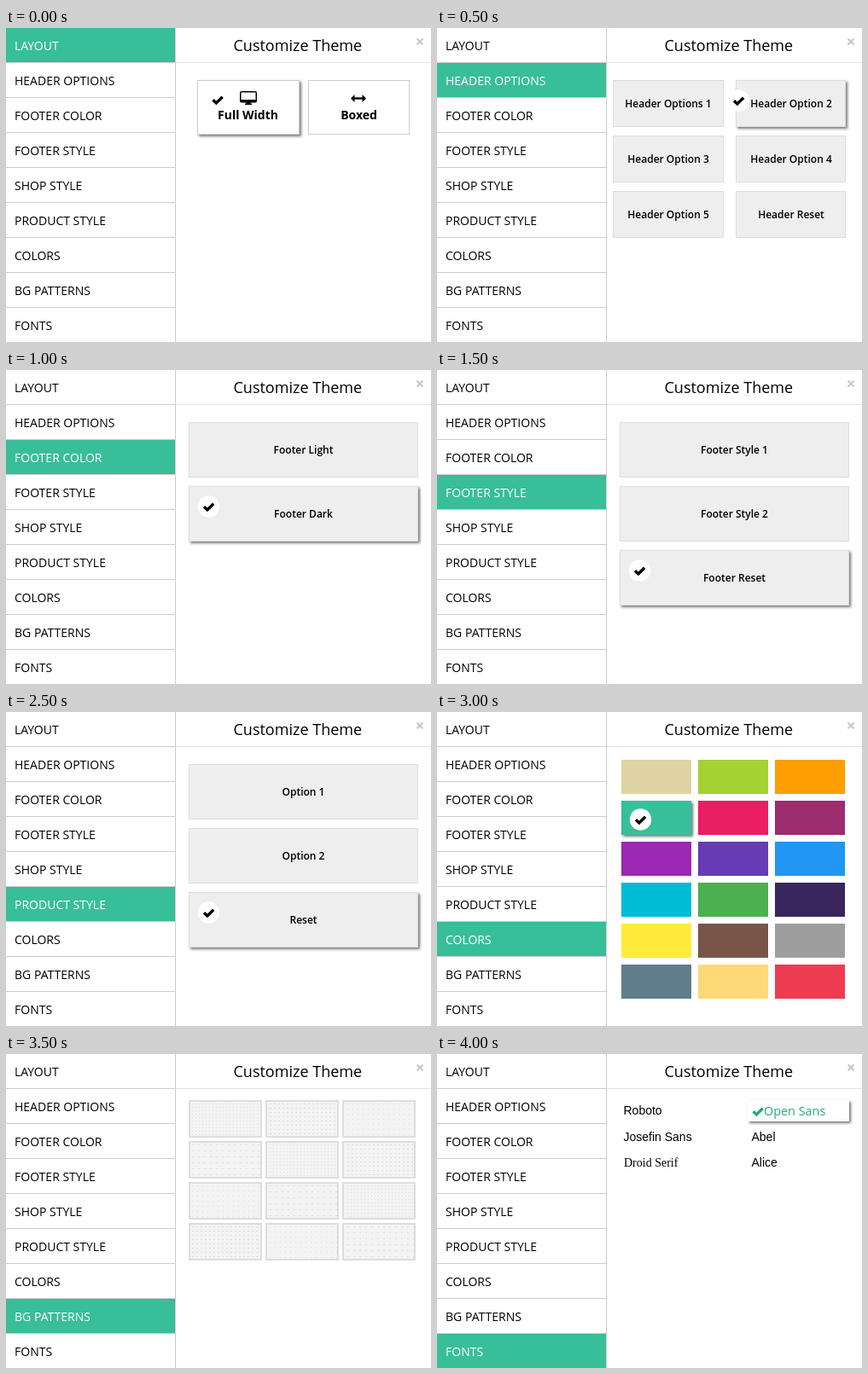
An HTML page with a canvas that plays this animation: 498 by 368 pixels, repeating every 4.5 s.

```html
<!DOCTYPE html>
<html lang="en">
<head>
<meta charset="utf-8">
<title>Customize Theme</title>
<style>
html, body { margin: 0; width: 100%; height: 100%; overflow: hidden; background: #fff; }
canvas { display: block; }
</style>
</head>
<body>
<canvas id="stage" width="498" height="368"></canvas>
<script>
const ctx = document.getElementById('stage').getContext('2d');
const GREEN = '#38be99';
const STEP = 500;
const OPEN = '"Open Sans", sans-serif';
const ARIAL = '"Liberation Sans", Arial, sans-serif';
const MENU = ['LAYOUT', 'HEADER OPTIONS', 'FOOTER COLOR', 'FOOTER STYLE', 'SHOP STYLE',
  'PRODUCT STYLE', 'COLORS', 'BG PATTERNS', 'FONTS'];
const SWATCHES = ['#dfd2a3', '#a4d233', '#ff9e01', GREEN, '#e91e63', '#9c2d6f',
  '#9c27b0', '#673ab7', '#2196f3', '#00bcd4', '#4caf50', '#38265c',
  '#ffeb3b', '#795548', '#9e9e9e', '#607d8b', '#ffd878', '#ed3c52'];

function rect(x, y, w, h, color) {
  ctx.fillStyle = color;
  ctx.fillRect(x, y, w, h);
}

function text(str, x, y, font, color = '#000', align = 'left') {
  ctx.font = font;
  ctx.fillStyle = color;
  ctx.textAlign = align;
  ctx.fillText(str, x, y);
}

function raised(x, y, w, h, color) {
  ctx.save();
  ctx.shadowColor = '#777';
  ctx.shadowBlur = 3;
  ctx.shadowOffsetX = ctx.shadowOffsetY = 2;
  rect(x, y, w, h, color);
  ctx.restore();
}

function card(x, y, w, h, fill, border, selected) {
  (selected ? raised : rect)(x, y, w, h, border);
  rect(x + 1, y + 1, w - 2, h - 2, fill);
}

function check(x, y, color = '#000') {
  ctx.strokeStyle = color;
  ctx.lineWidth = 3.4;
  ctx.beginPath();
  ctx.moveTo(x - 5.5, y - 0.2);
  ctx.lineTo(x - 1.6, y + 3.5);
  ctx.lineTo(x + 5.7, y - 3.7);
  ctx.stroke();
}

function badge(x, y) {
  ctx.fillStyle = '#fff';
  ctx.beginPath();
  ctx.arc(x, y, 12.7, 0, 7);
  ctx.fill();
  check(x, y + 0.5);
}

function monitor(x, y) {
  ctx.fillStyle = '#000';
  ctx.beginPath();
  ctx.roundRect(x, y, 20, 13.5, 2);
  ctx.fill();
  rect(x + 1.5, y + 1.5, 17, 8.5, '#fff');
  rect(x + 7.5, y + 13, 5, 2, '#000');
  rect(x + 6, y + 14.5, 8, 1.5, '#000');
}

function doubleArrow(x, y) {
  ctx.fillStyle = '#000';
  for (const s of [-1, 1]) {
    ctx.beginPath();
    ctx.moveTo(x + s * 9, y);
    ctx.lineTo(x + s * 4.5, y - 4.5);
    ctx.lineTo(x + s * 4.5, y + 4.5);
    ctx.fill();
  }
  rect(x - 6, y - 1.2, 12, 2.4, '#000');
}

function layout() {
  card(224, 61, 120, 64, '#fff', '#ccc', true);
  card(354, 61, 119, 64, '#fff', '#ccc', false);
  check(248, 84.5);
  monitor(274, 74);
  doubleArrow(413, 82.5);
  text('Full Width', 283.5, 107, 'bold 14px ' + OPEN, '#000', 'center');
  text('Boxed', 413.5, 107, 'bold 14px ' + OPEN, '#000', 'center');
}

function headers() {
  const names = ['Header Options 1', 'Header Option 2', 'Header Option 3',
    'Header Option 4', 'Header Option 5', 'Header Reset'];
  names.forEach((name, i) => {
    const x = 206 + i % 2 * 144, y = 61 + (i >> 1) * 65;
    card(x, y, i % 2 ? 129 : 130, 55, '#eee', '#ddd', i === 1);
    if (i === 1) badge(x + 3.5, y + 24);
    text(name, x + 65, y + 32, '600 12px ' + OPEN, '#000', 'center');
  });
}

function stack(names, selected) {
  names.forEach((name, i) => {
    const y = 61 + i * 75;
    card(214, y, 269, 65, '#eee', '#ddd', i === selected);
    if (i === selected) badge(237.5, y + 24);
    text(name, 348.5, y + 37, '600 12px ' + OPEN, '#000', 'center');
  });
}

function grid(count, draw) {
  for (let i = 0; i < count; i++) draw(216 + i % 3 * 90, 56 + Math.floor(i / 3) * 48, i);
}

function colors() {
  grid(SWATCHES.length, (x, y, i) => {
    (i === 3 ? raised : rect)(x, y, 82, 40, SWATCHES[i]);
    if (i === 3) badge(x + 22.5, y + 22);
  });
}

function patterns() {
  grid(12, (x, y, i) => {
    rect(x - 2, y - 2, 86, 44, '#ddd');
    rect(x, y, 82, 40, '#f3f3f3');
    const gap = 4 + i % 4;
    for (let dy = 2; dy < 40; dy += gap) {
      for (let dx = 2 + i % 3; dx < 82; dx += gap) {
        rect(x + dx, y + dy, 1 + i % 2, 1, '#dcdcdc');
      }
    }
  });
}

function fonts() {
  raised(364, 54, 119, 25, '#fff');
  check(376, 67.5, '#27a880');
  text('Open Sans', 383, 72, '14.4px ' + OPEN, '#27a880');
  text('Roboto', 218.5, 71, '14px ' + ARIAL);
  text('Josefin Sans', 218.5, 102, '14px ' + ARIAL);
  text('Abel', 368.5, 102, '14px ' + ARIAL);
  text('Droid Serif', 219, 132, '14px "Liberation Serif", Times, serif');
  text('Alice', 368.5, 132, '14px ' + ARIAL);
}

const PANELS = [
  layout,
  headers,
  () => stack(['Footer Light', 'Footer Dark'], 1),
  () => stack(['Footer Style 1', 'Footer Style 2', 'Footer Reset'], 2),
  () => stack(['Shop Style 1', 'Shop Style 2', 'Shop Reset'], 0),
  () => stack(['Option 1', 'Option 2', 'Reset'], 2),
  colors,
  patterns,
  fonts
];

function menu(active) {
  MENU.forEach((name, i) => {
    const y = i * 41, on = i === active;
    rect(0, y + 40, 198, 1, '#ccc');
    if (on) rect(0, y, 198, 40, GREEN);
    text(name, 10, y + 26, '14px ' + OPEN, on ? '#fff' : '#000');
  });
  rect(198, 0, 1, 368, '#ccc');
}

function heading() {
  rect(199, 40, 299, 1, '#e2e2e2');
  text('Customize Theme', 266.5, 27, '18px ' + OPEN);
  ctx.strokeStyle = '#c3cace';
  ctx.lineWidth = 2.2;
  ctx.beginPath();
  ctx.moveTo(481.5, 12.5);
  ctx.lineTo(488.5, 19.5);
  ctx.moveTo(488.5, 12.5);
  ctx.lineTo(481.5, 19.5);
  ctx.stroke();
}

let start = null;
function frame(now) {
  if (start === null) start = now;
  const active = Math.floor((now - start) / STEP) % PANELS.length;
  rect(0, 0, 498, 368, '#fff');
  menu(active);
  heading();
  PANELS[active]();
  requestAnimationFrame(frame);
}
requestAnimationFrame(frame);
</script>
</body>
</html>
```
